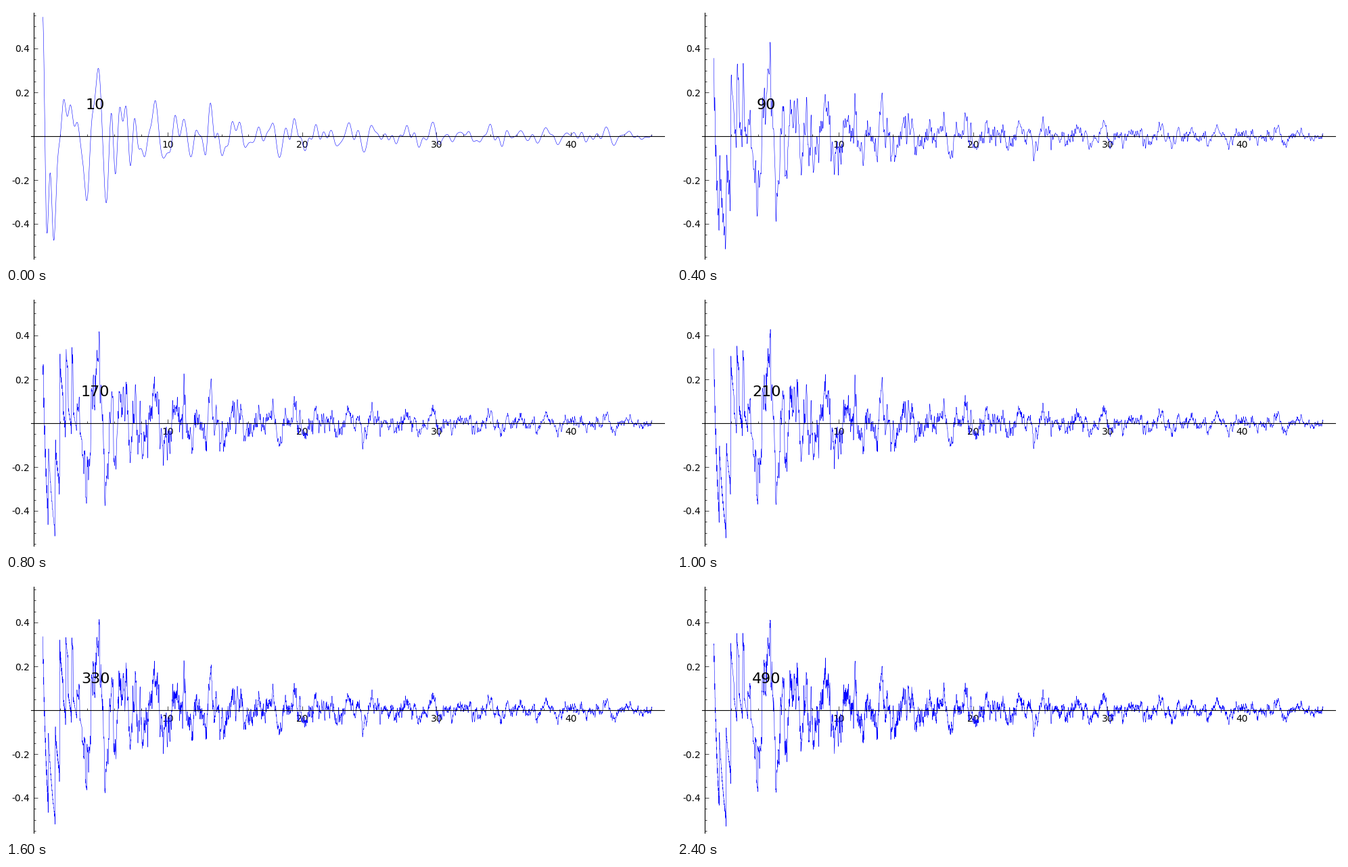
Animation of 983x384 px, one loop 2600 ms. Source, as a matplotlib script:

```python
import numpy as np
import matplotlib.pyplot as plt
from matplotlib.animation import FuncAnimation
from matplotlib.ticker import MultipleLocator, FuncFormatter

W, H, DPI = 983, 384, 100
CONDUCTOR = 192
COUNTS = range(10, 491, 40)

plt.rcParams["font.family"] = "DejaVu Sans"
plt.rcParams["axes.unicode_minus"] = False


def trace_of_frobenius(p):
    """p minus the affine point count of y^2 = x^3 - x^2 - 4x - 2 mod p."""
    if p == 2:
        return 0
    x = np.arange(p)
    chi = -np.ones(p, dtype=int)
    chi[x * x % p] = 1
    chi[0] = 0
    return -chi[(x**3 - x**2 - 4 * x - 2) % p].sum()


def dirichlet_coefficients(size):
    a = np.zeros(size)
    a[1] = 1
    factor = np.zeros(size, dtype=int)
    for n in range(2, size):
        if factor[n] == 0:
            factor[n::n] = np.where(factor[n::n] == 0, n, factor[n::n])
            a[n] = trace_of_frobenius(n)
            continue
        p = q = factor[n]
        while n % (q * p) == 0:
            q *= p
        if q < n:
            a[n] = a[q] * a[n // q]
        else:
            a[n] = a[p] * a[n // p]
            if CONDUCTOR % p:
                a[n] -= p * a[n // p**2]
    return a


def lfunction_zeros(count, delta=0.05, step=0.006, size=2**17):
    """Ordinates of the first positive zeros, from a rotated Mellin transform."""
    a = dirichlet_coefficients(2000)
    n = np.arange(1, len(a))
    u = np.arange(0, 7.5, step)
    y = np.exp(u + 1j * (np.pi / 2 - delta))
    scale = 2 * np.pi / np.sqrt(CONDUCTOR)
    g = y * np.array([np.exp(-scale * n * v) @ a[1:] for v in y])
    g[0] /= 2
    z = np.fft.ifft(g, size).imag
    t = 2 * np.pi * np.arange(size) / (size * step)
    z, t = z[(t > 0.3) & (t < 320)], t[(t > 0.3) & (t < 320)]
    i = np.flatnonzero(z[:-1] * z[1:] < 0)[:count]
    return t[i] + (t[i + 1] - t[i]) * z[i] / (z[i] - z[i + 1])


# Oscillatory term (2 / x) * sum sin(gamma x) / gamma, with x = log X.
# The central zero is counted but adds nothing to the sum.
xs = np.linspace(np.log(2), np.log(1e20), 5000)
gammas = lfunction_zeros(COUNTS[-1] - 1)
partial = np.cumsum(np.sin(np.outer(xs, gammas)) / gammas, axis=1)
curves = [2 / xs * partial[:, c - 2] for c in COUNTS]

# Stage geometry in pixels
LEFT, RIGHT, TOP, BOTTOM = 37, 973, 10, 375
X0, Y0, X_UNIT, Y_UNIT = 40.75, 193, 19.85, 325

fig = plt.figure(figsize=(W / DPI, H / DPI), dpi=DPI, facecolor="white")
ax = fig.add_axes([LEFT / W, 1 - BOTTOM / H, (RIGHT - LEFT) / W, (BOTTOM - TOP) / H])
ax.set_xlim((LEFT - X0) / X_UNIT, (RIGHT - X0) / X_UNIT)
ax.set_ylim((Y0 - BOTTOM) / Y_UNIT, (Y0 - TOP) / Y_UNIT)
ax.patch.set_visible(False)

for side in ("top", "right"):
    ax.spines[side].set_visible(False)
for side in ("left", "bottom"):
    ax.spines[side].set_position("zero")
    ax.spines[side].set_linewidth(0.8)


def style_axis(axis, major, minor, fmt):
    axis.set_major_locator(MultipleLocator(major))
    axis.set_minor_locator(MultipleLocator(minor))
    axis.set_major_formatter(
        FuncFormatter(lambda v, _: "" if abs(v) < 1e-9 else fmt % v))


style_axis(ax.xaxis, 10, 2, "%d")
style_axis(ax.yaxis, 0.2, 0.05, "%.1f")
ax.tick_params(which="major", direction="in", length=4, width=0.5, pad=4, labelsize=10)
ax.tick_params(which="minor", direction="in", length=2, width=0.5)

line, = ax.plot([], [], color="blue", lw=0.4)
label = ax.text(np.log(100), 0.142, "", fontsize=16, ha="center", va="center", zorder=5)


def update(i):
    line.set_data(xs, curves[i])
    label.set_text(str(COUNTS[i]))
    return line, label


anim = FuncAnimation(fig, update, frames=len(COUNTS), interval=200,
                     repeat=True, repeat_delay=0)
plt.show()
```
